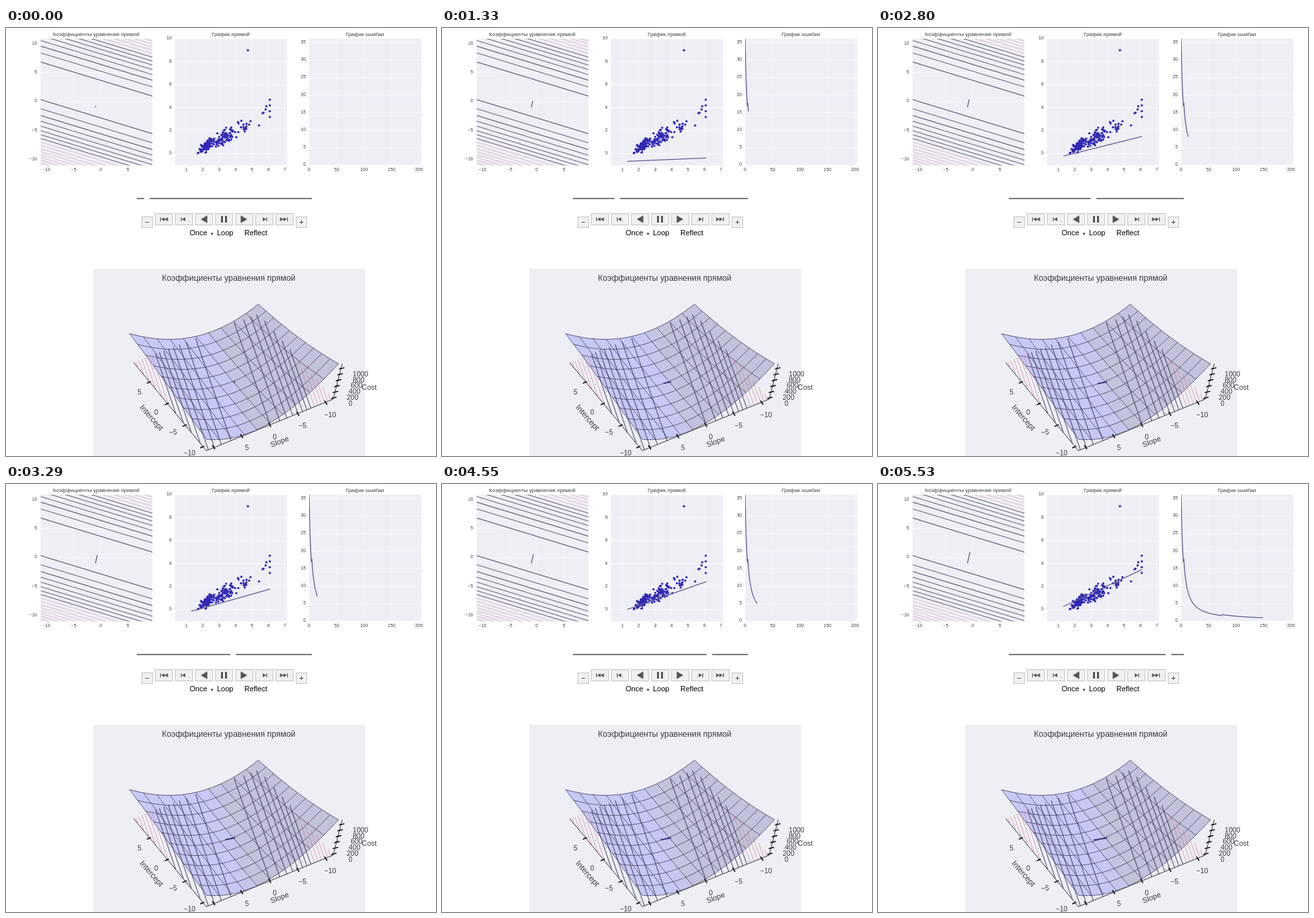
These frames come from a looping animation (644 by 640 pixels, 5600 ms). An HTML page with a canvas:

```html
<!DOCTYPE html>
<html lang="ru">
<head>
<meta charset="utf-8">
<style>
html, body { margin: 0; width: 100%; height: 100%; overflow: hidden; background: #fff; }
canvas { display: block; }
</style>
</head>
<body>
<canvas id="stage" width="644" height="640"></canvas>
<script>
const ctx = document.getElementById('stage').getContext('2d');
const LOOP = 5600, STEP = 206;
const PANEL = '#eeeef5', INK = '#3c3c44', CURVE = '#5f5f93', MESH = 'rgba(40,40,62,.8)';
const TITLE = 'Коэффициенты уравнения прямой';
const label = v => String(v).replace('-', '\u2212');
const range = (n, from = 0, step = 1) => Array.from({ length: n }, (_, i) => from + i * step);
const mix = (a, b, t) => a + (b - a) * t;

function text(str, x, y, size, { align = 'center', color = INK, angle = 0 } = {}) {
  ctx.save();
  ctx.translate(x, y);
  ctx.rotate(angle * Math.PI / 180);
  ctx.font = `${size}px "Liberation Sans", Arial, sans-serif`;
  ctx.textAlign = align;
  ctx.textBaseline = 'middle';
  ctx.fillStyle = color;
  ctx.fillText(str, 0, 0);
  ctx.restore();
}

function path(points, color, width, fill) {
  ctx.beginPath();
  points.forEach(p => ctx.lineTo(p[0], p[1]));
  if (fill) {
    ctx.closePath();
    ctx.fillStyle = fill;
    ctx.fill();
  }
  if (color) {
    ctx.strokeStyle = color;
    ctx.lineWidth = width;
    ctx.stroke();
  }
}

function dot(x, y, r, color) {
  ctx.beginPath();
  ctx.arc(x, y, r, 0, 7);
  ctx.fillStyle = color;
  ctx.fill();
}

function panel({ title, x, xs, ys, px, py }, drawInside) {
  const w = 168;
  ctx.save();
  ctx.beginPath();
  ctx.rect(x, 16, w, 189.5);
  ctx.clip();
  ctx.fillStyle = PANEL;
  ctx.fillRect(x, 16, w, 190);
  ys.forEach(v => path([[x, py(v)], [x + w, py(v)]], 'rgba(255,255,255,.75)', 1));
  xs.forEach(v => path([[px(v), 16], [px(v), 206]], 'rgba(255,255,255,.3)', 1));
  drawInside(px, py);
  ctx.restore();
  text(title, x + w / 2 - 0.5, 9.5, 8);
  xs.forEach(v => text(label(v), px(v), 212, 6.8));
  ys.forEach(v => text(label(v), x - 5, py(v) - 0.5, 6.8, { align: 'right' }));
}

const weightsPlot = {
  title: TITLE, x: 51.5, xs: range(4, -10, 5), ys: range(5, -10, 5),
  px: v => 142 + 8.14 * v, py: v => 110 - 8.66 * v
};
const fitPlot = {
  title: 'График прямой', x: 253, xs: range(7, 1), ys: range(6, 0, 2),
  px: v => 245.5 + 24.6 * v, py: v => 188 - 17.2 * v
};
const errorPlot = {
  title: 'График ошибки', x: 454, xs: range(5, 0, 50), ys: range(8, 0, 5),
  px: v => 454 + 0.8225 * v, py: v => 205 - 5.24 * v
};

// Scatter: noise grows with x, plus one column and one outlier
let seed = 7;
const random = () => (seed = seed * 16807 % 2147483647) / 2147483647;
const bell = () => random() + random() + random() - 1.5;
const samples = [[4.75, 9], ...range(4, 3.2, 0.5).map(y => [6.08, y])];
function cluster(count, center, spread) {
  for (let i = 0; i < count; i++) {
    const x = center + spread * bell();
    samples.push([x, Math.max(0.05, 0.72 * x - 0.95 + 0.19 * x * bell())]);
  }
}
cluster(85, 2.2, 0.4);
cluster(75, 3.35, 0.6);
cluster(16, 4.5, 0.4);
cluster(5, 5.6, 0.6);

// Training state after n iterations
const iterations = k => k < 24 ? k : (k - 23) * 50 - 1;
const slopeAt = n => 0.68 - 1.43 / (1 + 0.18 * n + 0.0065 * n * n);
const interceptFor = slope => -1 + 0.24 * (slope + 1);
const errorAt = n => n < 5 ? 36.3 / (1 + 0.28 * n) : 119 / (n + 1.8) * (n > 74 ? 1.2 : 1);

// Pixel distance of contour n from the valley line, on both sides
function eachContour(count, draw) {
  for (let n = 1; n <= count; n++) {
    const off = Math.sqrt(950 * n - 160);
    [-off, off].forEach(d => draw(d, n < 9));
  }
}

function drawWeights(tip) {
  panel(weightsPlot, (px, py) => {
    eachContour(18, (d, near) =>
      path([[52, 79 + d], [219.5, 130 + d]], near ? 'rgba(62,56,84,.75)' : 'rgba(190,125,145,.55)', near ? 1.1 : 0.8));
    path([-1, tip].map(b => [px(interceptFor(b)), py(b)]), '#55556f', 1.2);
  });
}

function drawFit(slope) {
  panel(fitPlot, (px, py) => {
    samples.forEach(([x, y]) => dot(px(x), py(y), 1.7, '#3029b4'));
    path([1.3, 6.1].map(x => [px(x), py(interceptFor(slope) + slope * x)]), CURVE, 1.3);
  });
}

function drawError(count) {
  panel(errorPlot, (px, py) => {
    if (count) path(range(count + 1).map(n => [px(n), py(errorAt(n))]), CURVE, 1.3);
  });
}

function button(x, y, w, h) {
  ctx.fillStyle = '#f0f0f2';
  ctx.fillRect(x, y, w, h);
  ctx.strokeStyle = '#c2c2c6';
  ctx.lineWidth = 1;
  ctx.strokeRect(x + 0.5, y + 0.5, w - 1, h - 1);
}

function drawControls(k) {
  path([[196, 255], [458, 255]], '#77777b', 2);
  dot(211 + 8.615 * k, 256.5, 4.5, '#fff');

  range(7, 223, 30.1).forEach(x => button(x, 277, 27, 18));
  [['-', 203], ['+', 434]].forEach(([sign, x]) => {
    button(x, 282, 17, 17);
    text(label(sign), x + 8.5, 291, 11, { color: '#222' });
  });
  for (const dir of [-1, 1]) {
    const at = d => 326.5 + dir * d;
    const arrow = (d, size) =>
      path([[at(d), 286 - size], [at(d), 286 + size], [at(d + size * 1.7), 286]], null, 0, '#55555a');
    const bar = (d, w, h) => path([[at(d), 286 - h], [at(d), 286 + h]], '#55555a', w);
    arrow(84, 3);
    arrow(89, 3);
    bar(95, 1.2, 3);
    arrow(58, 3);
    bar(64, 1.2, 3);
    arrow(25, 5.8);
    bar(3, 3, 5);
  }
  ['Once', 'Loop', 'Reflect'].forEach((name, i) =>
    text(name, 275 + 41 * i, 307, 11, { align: 'left', color: '#000' }));
  dot(308.5, 307.5, 1.5, '#333');
}

// Box corners: left, back, front, right
const FLOOR = [[191, 500], [378, 427], [300, 632], [490, 555]];
const ROOF = [[185, 457], [378, 382], [301, 578], [498, 502]];
const bilinear = (q, u, v, i) => mix(mix(q[0][i], q[1][i], u), mix(q[2][i], q[3][i], u), v);
const project = (u, v, h) => [0, 1].map(i => mix(bilinear(FLOOR, u, v, i), bilinear(ROOF, u, v, i), h));
const tilt = (u, v) => (1 - 2 * v) + 3.2 * (1 - 2 * u);
const surface = (u, v) => project(u, v, (tilt(u, v) ** 2 + (1 - 2 * u) ** 2) / 18.64);
const unit = value => (9.5 - value) / 20.5;

function drawMesh() {
  const N = 10;
  for (let j = 0; j < N; j++) {
    for (let i = 0; i < N; i++) {
      const cell = [[0, 0], [1, 0], [1, 1], [0, 1]].map(([x, y]) => surface((i + x) / N, (j + y) / N));
      const t = Math.max(0, Math.min(1, 0.5 - tilt((i + 0.5) / N, (j + 0.5) / N)));
      const shade = mix(200, 194, t);
      const fill = `rgb(${shade},${shade},${mix(246, 218, t)})`;
      path(cell, fill, 0.8, fill);
    }
  }
  const along = range(25, 0, 1 / 24);
  range(N + 1, 0, 1 / N).forEach(c => {
    path(along.map(s => surface(c, s)), MESH, 0.8);
    path(along.map(s => surface(s, c)), MESH, 0.8);
  });
}

function drawFloorContours() {
  eachContour(14, (d, near) => {
    const s = d * 0.0364;
    const ends = [Math.max(-1, s - 3.3), Math.min(1, s + 3.3)];
    const line = ends.map(a => project((1 - (s - a) / 3.3) / 2, (1 - a) / 2, 0));
    path(line, near ? 'rgba(48,42,78,.6)' : 'rgba(205,115,130,.65)', near ? 1.5 : 0.9);
  });
}

// Evenly spaced ticks and labels along one edge of the box
function ticks(count, [x, y], [stepX, stepY], [dx, dy]) {
  range(count).forEach(i => {
    const cx = x + stepX * i, cy = y + stepY * i;
    path([[cx - dx, cy - dy], [cx + dx, cy + dy]], '#111', 1.7);
  });
}
function tickLabels(values, [x, y], [stepX, stepY]) {
  values.forEach((v, i) => text(label(v), x + stepX * i, y + stepY * i, 10.5));
}

function drawSurface(tip) {
  ctx.fillStyle = PANEL;
  ctx.fillRect(131, 360, 407, 280);
  text(TITLE, 333.5, 374.5, 12.4);
  drawMesh();
  drawFloorContours();
  path([-1, tip].map(b => surface(unit(b), unit(interceptFor(b)))), 'rgba(45,45,115,.85)', 2);

  path([FLOOR[0], FLOOR[2], FLOOR[3], [503.5, 502]], '#33333a', 1);
  ticks(4, [214, 530], [26.7, 32.2], [3, -1.3]);
  ticks(5, [311, 627], [42, -16.7], [2, 3]);
  ticks(6, [491, 553], [2.35, -8.8], [4, -1]);
  tickLabels(range(4, 5, -5), [200, 545], [25, 30.3]);
  tickLabels(range(4, 5, -5), [361, 628], [41.5, -16.3]);
  tickLabels(range(6, 0, 200), [516, 562], [3, -8.8]);
  text('Intercept', 217.5, 583, 12, { angle: 49 });
  text('Slope', 410, 619, 11.2, { angle: -21 });
  text('Cost', 544, 538, 11);
}

function drawScene(k) {
  ctx.fillStyle = '#fff';
  ctx.fillRect(0, 0, 644, 640);
  const n = iterations(k), slope = slopeAt(n);
  const tip = slope + 0.002 * n;
  drawWeights(tip);
  drawFit(slope);
  drawError(n);
  drawControls(k);
  drawSurface(tip);
}

const start = performance.now();
let shown = -1;
function tick() {
  const k = Math.min(26, Math.floor((performance.now() - start) % LOOP / STEP));
  if (k !== shown) drawScene(shown = k);
  requestAnimationFrame(tick);
}
tick();
</script>
</body>
</html>
```
